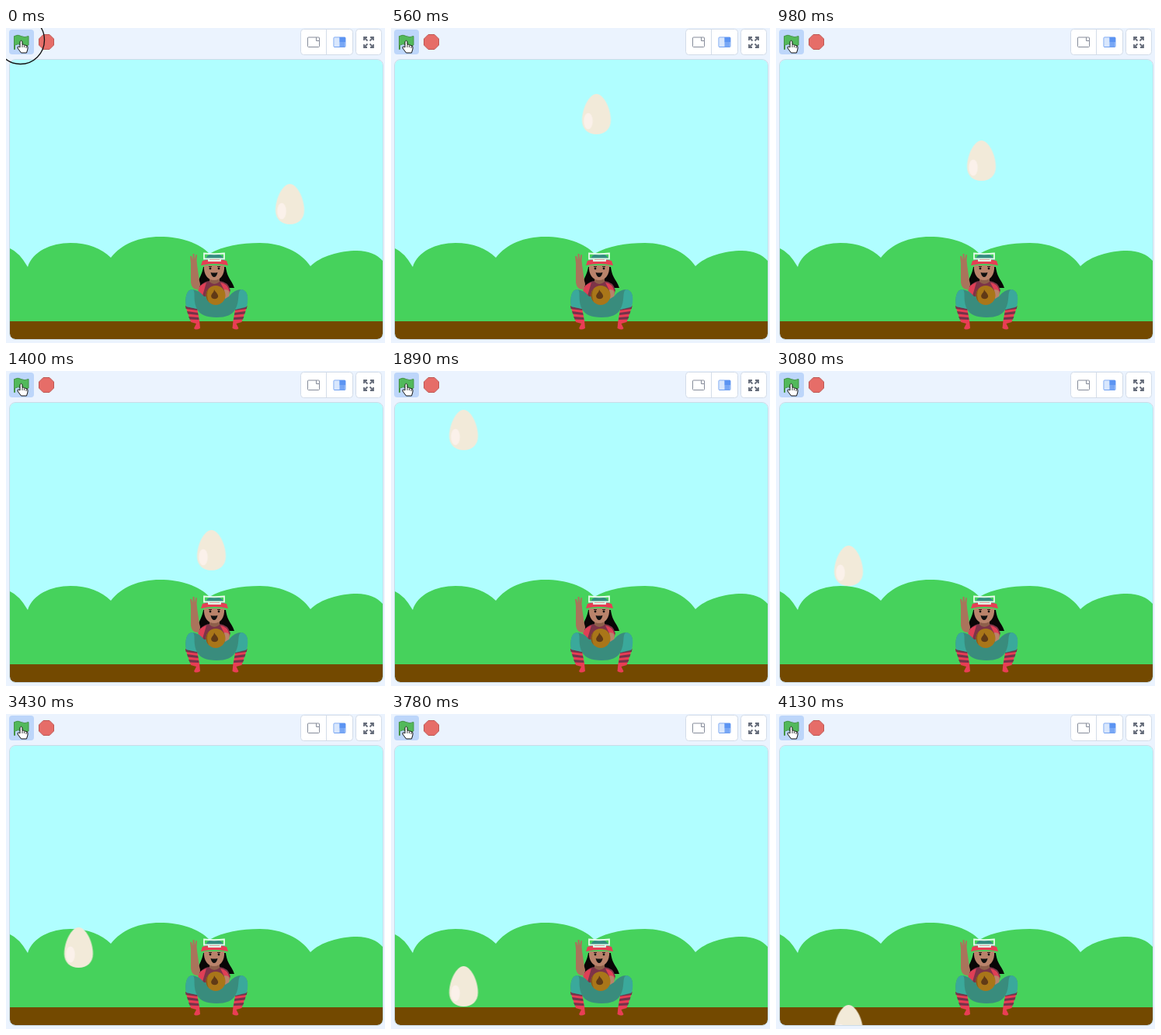
An HTML page for the animation above (4.2 s loop, 488 px wide and 406 px high).

```html
<!DOCTYPE html>
<html lang="en">
<head>
<meta charset="utf-8">
<title>Falling egg</title>
<style>
  html, body { margin: 0; width: 100%; height: 100%; overflow: hidden; background: #ebf3fe; }
  svg { display: block; width: 488px; height: 406px; }
  /* 60 ticks of 70 ms; the tiny lead keeps ticks clear of step edges */
  .egg { animation: drop 4200ms -4ms infinite; }
  .ripple { animation: ripple 4200ms -4ms step-end infinite; }
  @keyframes drop {
    0% { transform: translate(365.5px, 227px); animation-timing-function: step-end; }
    1.6667% { transform: translate(264.5px, 41px); animation-timing-function: steps(23); }
    39.999% { transform: translate(264.5px, 271px); animation-timing-function: step-end; }
    40% { transform: translate(93.5px, 46px); animation-timing-function: steps(15); }
    64.999% { transform: translate(93.5px, 196px); animation-timing-function: step-end; }
    65% { transform: translate(93.5px, 201px); animation-timing-function: steps(21); }
    100% { transform: translate(93.5px, 411px); }
  }
  @keyframes ripple {
    0% { opacity: 1; }
    1.6667%, 100% { opacity: 0; }
  }
</style>
</head>
<body>
<svg viewBox="0 0 488 406">
  <defs>
    <clipPath id="stage"><rect x="5" y="41" width="480" height="360" rx="7"/></clipPath>
    <g id="leg">
      <path d="M231 358 L246 361 L249 377 L250 387 Q244 390 242 387 L245 381 L238 379 Z" fill="#e93d55"/>
      <path d="M231 358 l15 3 .6 3 -15 -2z M233 365 l14 2 .6 3 -13.500 -1.500z M235 372 l13 1 .5 3 -12 -.5z" fill="#74334a"/>
    </g>
    <path id="arrow" d="M461 16 V12 H465 M461.500 12.500 L465.500 16.500"/>
  </defs>

  <!-- toolbar -->
  <rect x="4" y="2" width="32" height="32" rx="4" fill="#bdd6fa"/>
  <path d="M11 10.500 Q15 8 19.500 10.500 T29 10.500 V22 Q24.500 24.500 20 22 T11.500 22 V27.500 H10.500 V10.500Z"
        fill="#52b95b" stroke="#459345" stroke-linejoin="round"/>
  <path d="M48 8.500 H56 L61.500 14 V22 L56 27.500 H48 L42.500 22 V14Z"
        fill="#e66d68" stroke="#bd5754" stroke-linejoin="round"/>
  <g fill="#fff" stroke="#d3dce9">
    <rect x="379.500" y="1.500" width="67" height="33" rx="4"/>
    <path d="M412.500 2 V34"/>
    <rect x="450.500" y="1.500" width="33" height="33" rx="4"/>
  </g>
  <g fill="#fff" stroke="#858b99">
    <rect x="388.500" y="12" width="15" height="12.500" rx="1"/>
    <path d="M399.500 12 V16.500 H403.500"/>
  </g>
  <rect x="422" y="12" width="15" height="12.500" rx="1" fill="#b6d0fb" stroke="#6e9ff0"/>
  <path d="M429.500 12 H437 V18 H429.500Z" fill="#5c94f2"/>
  <path d="M422.500 12.500 H429 V18.500 H436.500 V24 H422.500Z" fill="#d9e7fd"/>
  <rect x="429.500" y="18" width="7" height="6" fill="#78a7f5"/>
  <g fill="none" stroke="#646b79" stroke-width="1.800">
    <use href="#arrow"/>
    <use href="#arrow" transform="matrix(-1 0 0 1 934 0)"/>
    <use href="#arrow" transform="matrix(1 0 0 -1 0 37)"/>
    <use href="#arrow" transform="matrix(-1 0 0 -1 934 37)"/>
  </g>

  <!-- stage -->
  <g clip-path="url(#stage)">
    <rect x="5" y="41" width="480" height="360" fill="#b0feff"/>
    <path fill="#46d25c" d="M5 284 Q17 289 28 308 C34 288 58 277 83 277 C105 277 123 284 135 296
      C149 278 172 269 198 269 C225 269 249 277 262 291 C279 281 303 277 327 277 C355 277 380 289 392 307
      C405 294 430 287 452 287 C466 287 478 292 485 300 V380 H5Z"/>
    <rect x="5" y="378" width="480" height="23" fill="#734900"/>

    <g class="player">
      <path d="M254 308 C252 322 244 326 248 335 H294 C291 325 285 323 283 308Z" fill="#080606"/>
      <path d="M238 303 L237 294 l2 0 1.500 5 0 -8 h2 l.5 7 1.500 -6 1.500 .5 -.5 8 Q246 303 246 305
        L249 326 Q252 333 247 337 Q239 337 238 328Z" fill="#a9745b"/>
      <path d="M249 333 Q256 326 262 326 H275 Q286 327 289 338 L286 347 H252Z" fill="#7d3448"/>
      <path d="M247 338 Q250 330 258 328 L253 345Z M276 328 Q285 329 288 340 L284 344Z" fill="#df3f56"/>
      <path d="M262 321 H275 V327 Q268 333 262 327Z" fill="#8f604b"/>
      <path d="M255 306 H281 C282 318 276 325 268 325 C260 325 254 318 255 306Z" fill="#b9836b"/>
      <path d="M261 307.500 h4 M272 307.500 h4" stroke="#30201c"/>
      <g fill="#111">
        <circle cx="263" cy="310" r="1.400"/>
        <circle cx="274" cy="310" r="1.400"/>
        <path d="M263.500 315 Q268 316 272.500 315 Q271 321 268 321 Q265 321 263.500 315Z"/>
      </g>
      <path d="M256 301 Q257 291 268 291 Q280 291 281 301Z" fill="#348c81"/>
      <path d="M253 300 Q268 296 284 300 L286 306 Q268 302 251 306Z" fill="#e63e54"/>
      <g fill="none" stroke="#e2fae9" stroke-width="1.800">
        <path d="M255 290.500 Q268 292 281 290.500 V297.500 H255Z M261 298 V300 H276 V298"/>
      </g>
      <use href="#leg"/>
      <use href="#leg" transform="matrix(-1 0 0 1 541.500 0)"/>
      <path d="M232 359 C230 346 233 337 240 337 Q249 338 255 346 H287 Q294 337 303 337
        C311 338 313 347 309 360 L295 363 Q290 373 271 373 Q251 373 246 362Z" fill="#398c7d"/>
      <path d="M232 359 C230 346 233 337 240 337 C245 338 240 351 246 362Z
        M310 359 C313 347 311 338 303 337 C297 339 302 351 295 363Z" fill="#3aa99b"/>
      <path d="M281 337 Q290 337 287 346 L282 349Z" fill="#b9836b"/>
      <circle cx="270" cy="344.500" r="12.500" fill="#a97619"/>
      <path d="M261 336 A12.500 12.500 0 0 0 261 353 Q257 344 261 336Z" fill="#865619"/>
      <path d="M268 337 C270 341 274 343 273 347 Q270 351 265 348 C262 343 268 342 268 337Z" fill="#613a16"/>
    </g>

    <g class="egg">
      <path d="M0 -26 C9 -26 18.500 -8 18.500 8 C18.500 19 11 26 0 26 S-18.500 19 -18.500 8 C-18.500 -8 -9 -26 0 -26Z" fill="#f2ead9"/>
      <ellipse cx="-10.500" cy="9" rx="5.800" ry="10.500" fill="#fbf1ea"/>
    </g>
  </g>
  <rect x="4.500" y="40.500" width="481" height="361" rx="7.500" fill="none" stroke="#cbdce8"/>

  <!-- pointer -->
  <path d="M18 25 V17.500 Q19.500 15 21 17.500 V21.500 Q22.500 20.500 23.500 22 Q25 21.500 26 23
    Q27.500 22.500 28 24 V27 L26.500 32 H19.500 L15 26 Q14.500 23.500 16.500 24Z"
    fill="#fff" stroke="#111" stroke-linejoin="round"/>
  <path d="M21 22 V25 M23.500 22.500 V25 M26 23.500 V26" stroke="#111" stroke-width=".8"/>
  <circle class="ripple" cx="18.500" cy="15.500" r="31" fill="none" stroke="#111" stroke-width="1.300"/>
</svg>
</body>
</html>
```
